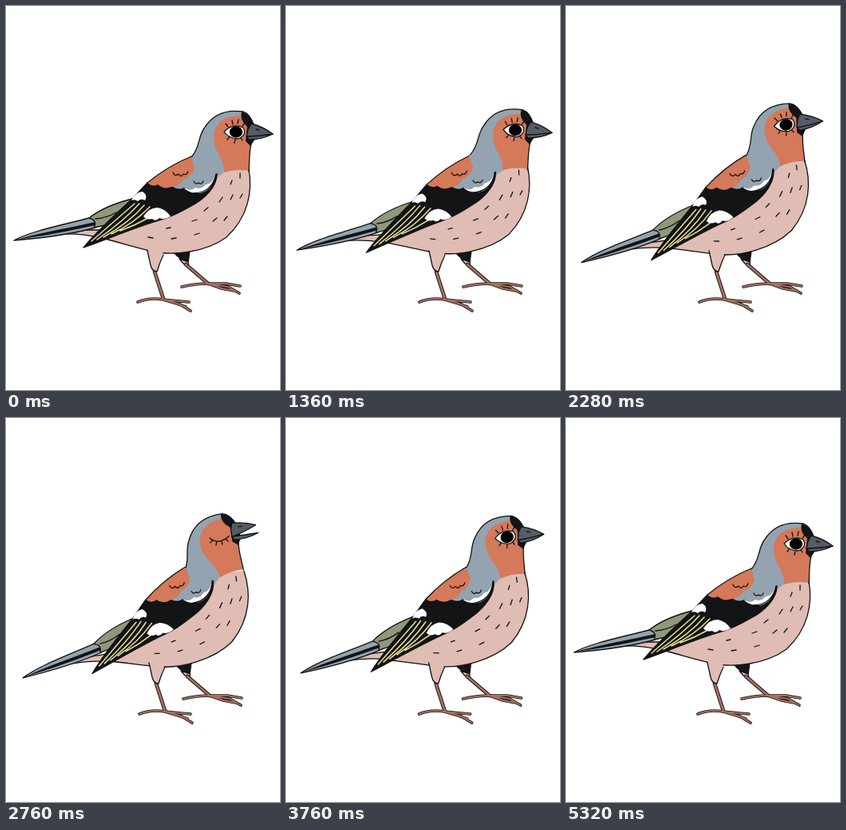
Recreate the animation shown at these times as an HTML page. Size 343 px wide and 480 px high, loop 5480 ms.

```html
<!DOCTYPE html>
<html lang="en">
<head>
<meta charset="utf-8">
<title>Chaffinch</title>
<style>
html, body { margin: 0; width: 100%; height: 100%; overflow: hidden; background: #fff; }
svg { display: block; width: 100%; height: 100%; }
path { fill: none; stroke-linecap: round; stroke-linejoin: round; }
.line { stroke: #111; stroke-width: 1.3; }
.pink { fill: #dfbcb4; }
.grey { fill: #94a3b0; }
.rust { fill: #d4795a; }
.olive { fill: #8f987b; }
.black { fill: #131416; }
.beak { fill: #555c66; }
.white { fill: #fff; }
.cream { stroke: #e9e196; stroke-width: 1.5; }
.shin { stroke: #111; stroke-width: 4.6; }
.skin { stroke: #a8705f; stroke-width: 2.7; }
.toe { stroke-width: 3.6; }
.toe.skin { stroke-width: 2; }
</style>
</head>
<body>
<svg viewBox="0 0 343 480">
  <g id="legs">
    <path class="black line" d="M210 306 L230 306 L228 321 Q218 317 210 308Z"/>
    <path class="pink line" d="M217 316 L228 320 L229 326 L222 322Z"/>
    <g id="shins"></g>
  </g>

  <g id="tail">
    <path class="pink line" d="M68 285 L100 280 L125 280 L120 290 Q95 284 68 285Z"/>
    <path class="grey line" d="M10 293 C32 281 70 274 104 265 L125 268 L112 277 C80 286 45 290 10 293Z"/>
    <path class="black" d="M13 292 C45 283 80 277 112 270 L112 274 C80 281 50 287 13 292Z"/>
    <path class="olive line" d="M104 265 C118 254 138 246 158 241 L135 272 L110 277 Q115 268 104 265Z"/>
    <path class="line" d="M112 266 Q126 265 138 258"/>
  </g>

  <g id="body">
    <path class="pink" d="M112 288 L150 262 L235 195 L304 204 C309 232 303 264 276 289 C250 308 208 313 180 306 C156 300 140 295 112 288Z"/>
    <path class="line" d="M304 204 C309 232 303 264 276 289 C250 308 208 313 180 306 C156 300 140 295 120 290"/>
    <path class="line" d="M293 209 v6 M283 218 l-2 5 M271 239 l-4 6 M284 236 l-3 6 M296 235 l-3 5 M253 252 l-5 4 M264 265 l-5 4 M277 263 l-4 5 M239 267 l-6 2 M242 284 l-6 2 M213 290 l-6 1 M184 290 l-6 -1 M206 277 l-5 1"/>
  </g>
  <g id="thigh">
    <path class="pink" d="M177 302 L181 324 Q183 332 189 332 L198 304Z"/>
    <path class="line" d="M177 306 L181 324 Q183 332 189 332 Q192 322 197 311"/>
  </g>

  <g id="front">
    <path class="grey" d="M227 188 C235 172 235 160 240 148 C244 133 255 128 267 128 C287 128 298 142 298 162 L298 202 L258 216 L225 222Z"/>
    <path class="rust" d="M236 158 C239 138 250 128 267 128 C287 128 298 142 298 162 L298 199 C284 197 274 202 264 197 C250 189 238 178 236 158Z"/>
    <path id="cheek" class="grey" d="M298 164 L298 202 L289 199 Q291 184 298 164Z"/>
    <path class="pink" d="M260 209 Q276 194 298 198 L301 216 L262 222Z"/>
    <path class="line" d="M227 188 C235 174 234 160 239 148 C244 133 255 128 267 128 C287 128 298 142 298 162 L299 207"/>
    <path class="black" d="M255 131 Q267 126 278 131 Q275 144 267 147 Q258 144 255 131Z"/>
    <path class="beak line" d="M266 148 L277 159 L267 173 L258 160Z"/>
    <path class="line" d="M258 160 L267 157 L277 159"/>
    <g id="frontEyes">
      <path class="white line" d="M239 154 Q248 144 258 153 Q248 164 239 154Z"/>
      <path class="white line" d="M275 152 Q284 142 294 151 Q285 162 275 152Z"/>
      <ellipse cx="249" cy="153.500" rx="5.300" ry="5.600"/>
      <ellipse cx="284" cy="151.500" rx="5.300" ry="5.600"/>
      <path class="line" d="M240 148 l-2 -3 M245 145 v-4 M250 145 v-4 M241 160 l-2 3 M246 161 l-1 4 M252 160 v4 M280 143 l-1 -4 M286 142 l1 -4 M291 145 l3 -4 M281 159 l-1 4 M287 159 l1 4 M292 156 l3 3"/>
    </g>
  </g>

  <g id="side">
    <path class="grey" d="M232 189 C243 177 240 164 248 153 C258 136 275 129 297 132 L306 150 L275 206 L260 218 L225 222Z"/>
    <path class="rust" d="M300 138 C275 134 259 147 260 166 C261 184 274 190 273 208 Q288 203 304 206 C305 194 304 184 307 172 L310 150Z"/>
    <path class="line" d="M232 189 C243 177 240 164 248 153 C258 136 275 129 297 132 Q306 135 310 149 M307 172 C304 184 305 194 304 207"/>
    <path class="black" d="M295 132 Q306 134 311 149 L302 151 Q292 142 295 132Z"/>
    <path class="black" d="M302 150 L311 150 L312 166 L306 175 L300 169Z"/>
    <path id="lowerBeak" class="beak line" d="M301 163 L334 160 Q320 167 304 167Z"/>
    <path id="upperBeak" class="beak line" d="M307 147 Q322 151 334 160 Q316 163 301 163 L303 154Z M313 154 l4 1"/>
    <g id="openEye">
      <path class="white line" d="M273 157 Q284 146 297 152 Q302 161 291 166 Q279 166 273 157Z"/>
      <ellipse cx="288" cy="157.500" rx="8.200" ry="7.200"/>
      <path class="line" d="M275 147 l3 4 M283 143 l1 5 M291 142 l-1 5 M299 146 l-3 4 M277 167 l3 -4 M286 171 l1 -4 M296 168 l-2 -3"/>
    </g>
    <path id="shutEye" class="line" d="M274 157 Q281 169 298 161 M276 161 l-3 2 M281 164 l-2 4 M287 165 v4 M293 164 l2 3"/>
  </g>

  <g id="wing">
    <path class="black line" d="M97 302 C115 280 140 258 158 241 C165 234 170 228 177 221 L225 220 L264 210 C264 225 250 241 230 251 C216 259 205 264 195 267 C170 274 138 287 97 302Z"/>
    <path class="cream" d="M161 247 Q138 267 107 294 M167 247 Q146 270 114 292 M173 249 Q154 271 122 289 M180 251 Q160 272 132 285 M176 266 Q160 275 143 281"/>
    <path class="white" d="M157 243 Q161 233 171 232 Q178 237 174 243 Q169 240 165 244 Q161 241 157 243Z"/>
    <path class="white" d="M172 263 Q179 252 190 252 Q200 254 206 263 Q198 268 192 265 Q187 270 183 266 Q176 268 172 263Z"/>
    <path class="white line" d="M222 228 C235 240 258 237 263 211 L240 218Z"/>
    <path class="grey" d="M231 190 L247 195 L263 209 C260 218 256 223 250 223 Q244 230 237 227 Q230 233 223 227 Q215 231 208 225Z"/>
    <path class="rust" d="M232 188 C210 197 194 207 177 221 Q184 227 190 223 Q198 230 207 226 Q216 226 222 217 Q232 214 236 203Z"/>
    <path class="line" d="M232 188 C210 197 194 207 177 221 M263 210 C260 225 250 234 234 234"/>
    <path class="line" d="M209 208 q2 6 7 2 q3 5 6 0 q4 2 6 -3 M235 219 q2 5 6 2 q4 3 6 -2"/>
  </g>
</svg>
<script>
const LOOP = 5480, STEP = 40;
const el = id => document.getElementById(id);

const shins = [
  ["", "M186 332 L197 366"],
  ["", "M225 323 L253 347"],
  ["toe", "M165 370 Q180 364 197 367 L217 369 L229 370 M197 367 L218 373 L231 381 M197 367 L214 372 L225 376"],
  ["toe", "M220 351 Q237 347 253 347 L275 347 L293 350 M253 347 L278 351 L292 359 M253 347 L270 353 L286 356"]
];
el("shins").innerHTML = ["shin", "skin"].map(layer =>
  shins.map(([kind, d]) => `<path class="${layer} ${kind}" d="${d}"/>`).join("")).join("");

// Each track lists [time in ms, value] pairs, eased between.
const tracks = {
  body: [[240, 0], [480, 5], [760, 0], [1320, 3], [1840, 3.6], [2280, 7.8], [2700, 8.6], [3160, 10], [3560, 9.4], [4120, 3.2], [4440, 3.7], [4800, 0]],
  tail: [[240, 0], [760, 4.4], [1320, 3.4], [1840, 4], [2280, 7.8], [3160, 10], [3560, 9.4], [4120, 2.2], [4440, 1.8], [4800, 0]],
  shift: [[480, 0], [760, -4], [1000, -2], [1320, 0], [4080, 0], [4440, -3.5], [4800, 0]],
  tilt: [[760, 0], [1320, 4], [1840, -7], [2280, -1], [2700, -7], [3160, -1], [3400, -6], [3700, 0]],
  open: [[1480, 0], [1640, 1], [1840, .8], [2080, 0], [2520, 0], [2700, 1], [2920, .3], [3120, 1], [3400, 1], [3640, 0]],
  legs: [[240, 0], [760, 2], [3600, 2], [4200, 0]],
  frontX: [[760, 2.5], [4440, 0], [4800, 4]],
  frontY: [[760, 2], [4440, 0], [4800, 3]]
};

function valueAt(track, t) {
  const next = track.findIndex(key => key[0] > t);
  if (next === 0) return track[0][1];
  if (next < 0) return track[track.length - 1][1];
  const [t0, a] = track[next - 1], [t1, b] = track[next];
  const u = (t - t0) / (t1 - t0);
  return a + (b - a) * u * u * (3 - 2 * u);
}

const between = (t, from, to) => t >= from && t < to;
const show = (id, on) => { el(id).style.display = on ? "" : "none"; };
const place = (id, transform) => el(id).setAttribute("transform", transform);

function draw(now) {
  const t = Math.floor(now % LOOP / STEP) * STEP;
  const pose = {};
  for (const name in tracks) pose[name] = valueAt(tracks[name], t);

  const lean = `translate(${pose.shift}) rotate(${-pose.body} 217 238)`;
  place("body", lean);
  place("wing", lean);
  place("side", `${lean} rotate(${pose.tilt} 268 208)`);
  place("tail", `rotate(${-pose.tail} 217 238)`);
  place("legs", `translate(${pose.legs})`);
  place("thigh", `translate(${pose.legs})`);
  place("front", `translate(${pose.frontX} ${pose.frontY})`);
  place("upperBeak", `rotate(${-7 * pose.open} 302 162)`);
  place("lowerBeak", `rotate(${14 * pose.open} 302 163)`);

  const facing = between(t, 520, 1000) || between(t, 4160, 5320);
  const asleep = between(t, 2600, 3600);
  show("front", facing);
  show("side", !facing);
  show("cheek", t < 2000);
  show("openEye", !asleep);
  show("shutEye", asleep);
}

const start = performance.now();
function tick() {
  draw(performance.now() - start);
  requestAnimationFrame(tick);
}
tick();
</script>
</body>
</html>
```
